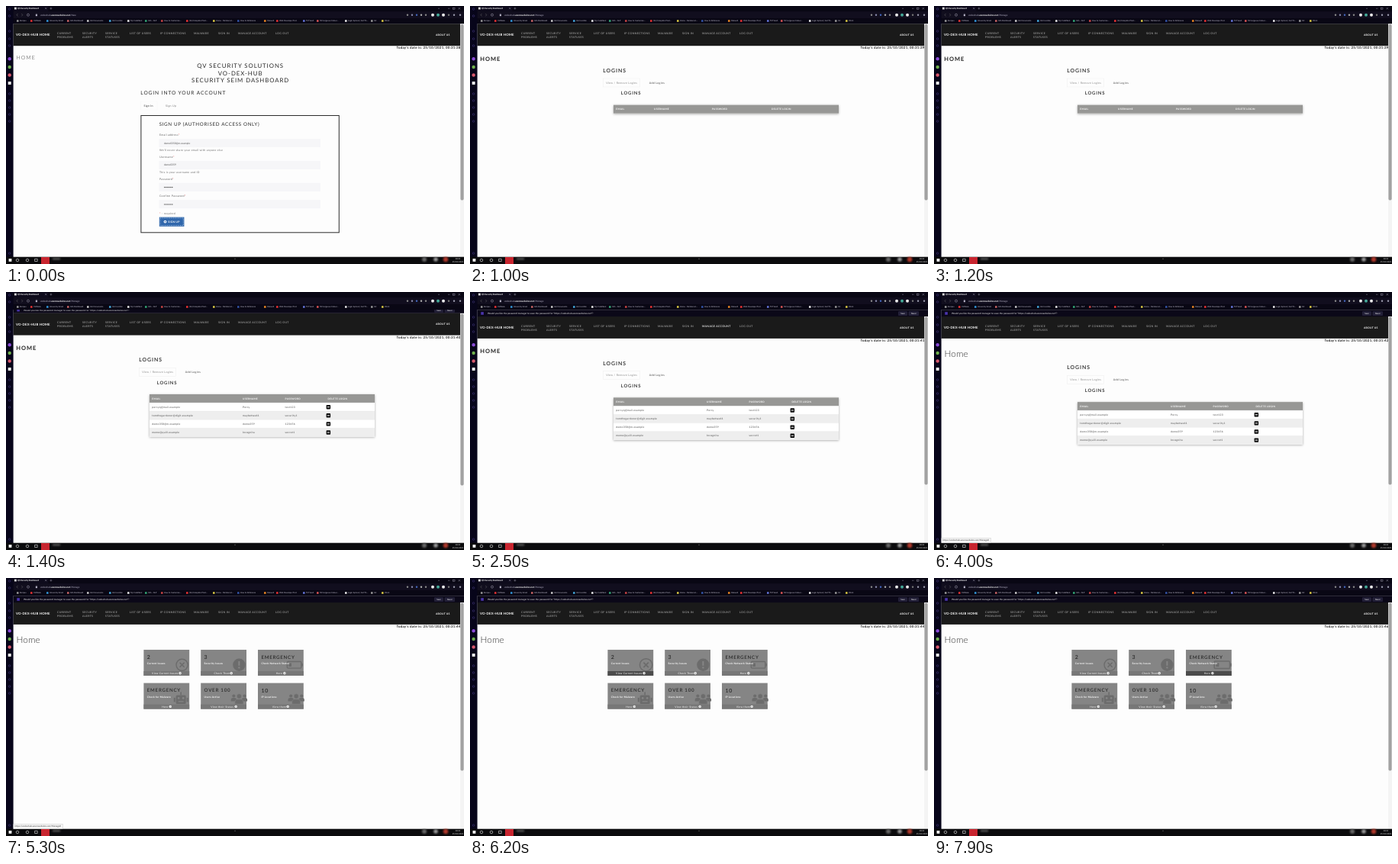
An HTML page that plays this animation: 600 by 338 pixels, repeating every 8000 ms.

```html
<!DOCTYPE html>
<html lang="en">
<head>
<meta charset="utf-8">
<title>Security Dashboard</title>
<style>
html, body { margin: 0; width: 100%; height: 100%; overflow: hidden; background: #000; }
svg { display: block; width: 100vw; height: 100vh; }
text { font-family: Lato, "Open Sans", sans-serif; white-space: pre; text-rendering: geometricPrecision; }
</style>
</head>
<body>
<svg id="stage" viewBox="0 0 600 338"></svg>
<script>
const LOOP = 8000;
const HOST = 'vodexhub.azurewebsites.net';

// y is the middle of the capitals
const T = (x, y, s, size, o = {}) =>
  `<text x="${x}" y="${y + size * 0.36}" font-size="${size}" font-weight="${o.w || 400}" ` +
  `letter-spacing="${o.ls ?? 0.3}" fill="${o.fill || '#555'}" text-anchor="${o.a || 'start'}"` +
  `${o.id ? ` id="${o.id}"` : ''}>${s}</text>`;
const R = (x, y, w, h, fill, extra = '') =>
  `<rect x="${x}" y="${y}" width="${w}" height="${h}" fill="${fill}" ${extra}/>`;
const C = (x, y, r, fill, extra = '') => `<circle cx="${x}" cy="${y}" r="${r}" fill="${fill}" ${extra}/>`;
const P = (d, stroke, w = 0.5) => `<path d="${d}" fill="none" stroke="${stroke}" stroke-width="${w}"/>`;
const G = (id, body, extra = '') => `<g id="${id}" ${extra}>${body}</g>`;

function nav() {
  const links = [[67, 'CURRENT', 'PROBLEMS'], [100, 'SECURITY', 'ALERTS'], [130, 'SERVICE', 'STATUSES'],
    [162, 'LIST OF USERS'], [202, 'IP CONNECTIONS'], [246, 'MALWARE'], [278, 'SIGN IN'],
    [304, 'MANAGE ACCOUNT'], [353, 'LOG OUT']];
  let s = R(9.5, 23.2, 585.5, 29, '#1a1a1a');
  s += T(13, 37.6, 'VO-DEX-HUB HOME', 4.3, { w: 700, ls: 0.2, fill: '#fff' });
  for (const [x, ...lines] of links) {
    lines.forEach((line, i) => {
      const id = line.startsWith('MANAGE') ? 'manage' : '';
      s += T(x, 35.6 + i * 5.2, line, 3.55, { w: 600, fill: '#a0a0a0', id });
    });
  }
  return s + T(563, 37.7, 'ABOUT US', 3.4, { w: 700, ls: 0.2, fill: '#fff' });
}

function signup() {
  const title = { a: 'middle', ls: 0.94, fill: '#2a2a2a' };
  const small = { fill: '#666' };
  const star = '<tspan fill="#e03030">*</tspan>';
  const field = (y, label, value, hint) =>
    T(201, y, label + star, 3.6, { ls: 0.25, fill: '#666' }) +
    R(200.5, y + 5, 211.5, 11, '#f6f6f8') +
    (value ? T(207, y + 10.5, value, 3.3, { ls: 0, fill: '#555' })
      : [0, 1, 2, 3, 4, 5].map(i => C(207.8 + i * 2, y + 10.7, 0.7, '#444')).join('')) +
    (hint ? T(201, y + 19.5, hint, 3.5, small) : '');
  return T(13.6, 67.6, 'HOME', 7, { w: 300, ls: 0.95, fill: '#333' }) +
    T(307.1, 78.5, 'QV SECURITY SOLUTIONS', 7.8, title) +
    T(307.1, 88, 'VO-DEX-HUB', 7.8, title) +
    T(307.1, 97.5, 'SECURITY SEIM DASHBOARD', 7.8, title) +
    T(176.3, 114, 'LOGIN INTO YOUR ACCOUNT', 6.65, { ls: 0.9, fill: '#2a2a2a' }) +
    R(176.5, 125, 21.5, 11, 'none', 'stroke="#f3f3f3" stroke-width=".4"') +
    T(180.5, 130.3, 'Sign In', 3.6, { ls: 0.25, fill: '#333' }) +
    T(209, 130.3, 'Sign Up', 3.6, { fill: '#777' }) +
    R(176.9, 143.5, 259.4, 153.3, '#fdfdfd', 'stroke="#2c2c2c" stroke-width="1"') +
    T(200.7, 155.2, 'SIGN UP (AUTHORISED ACCESS ONLY)', 6.3, { ls: 0.62, fill: '#2a2a2a' }) +
    field(169, 'Email address', 'demo0358@m.example', "We'll never share your email with anyone else") +
    field(197.8, 'Username', 'demo0359', 'This is your username and ID') +
    field(226.8, 'Password') + field(249.2, 'Confirm Password') +
    T(201, 271.5, star + ' - required', 3.5, small) +
    R(200.8, 276.6, 32.6, 12.2, '#2f66ab') +
    R(202, 277.8, 30.2, 9.8, 'none', 'id="focus" stroke="#cfe0f5" stroke-width=".8" stroke-dasharray="1 1.4"') +
    C(208.5, 282.6, 1.9, '#fff') + C(208.5, 282.6, 0.8, '#2f66ab') +
    T(212.3, 282.6, 'SIGN UP', 3.5, { w: 700, ls: 0.2, fill: '#fff' });
}

function table(cols, rows) {
  const x = 188, y = 129.6, w = 295, h = 11.1;
  const heads = ['EMAIL', 'USERNAME', 'PASSWORD', 'DELETE LOGIN'];
  let s = R(x, y, w, h * (rows.length + 1), '#fff', 'filter="url(#soft)"') + R(x, y, w, h, '#979795');
  heads.forEach((t, i) => s += T(cols[i], y + 5.6, t, 3.2, { w: 700, fill: '#fff' }));
  rows.forEach((row, i) => {
    const top = y + h * (i + 1), mid = top + 5.6;
    s += R(x, top, w, h, i % 2 ? '#eee' : '#fff') + P(`M${x} ${top}h${w}`, '#ddd', 0.3);
    row.forEach((t, k) => s += T(cols[k], mid, t, 3.3, { fill: '#444' }));
    s += R(419.6, mid - 2.7, 5.5, 5.4, '#0a0a0a', 'rx=".8"') + R(420.7, mid - 0.5, 3.3, 1, '#fff');
  });
  return s;
}

function logins() {
  const rows = [['percyq@mail.example', 'Percy', 'test123'],
    ['tomthegardener@digit.example', 'maybetwo61', 'security1'],
    ['demo358@m.example', 'demo359', '123456'],
    ['memo@quill.example', 'Incognita', 'secret1']];
  return T(174.3, 84.4, 'LOGINS', 6.9, { w: 600, ls: 0.94, fill: '#222' }) +
    R(174.3, 95, 48.2, 11, 'none', 'stroke="#eee" stroke-width=".5"') +
    T(178.2, 100.4, 'View / Remove Logins', 3.6, { fill: '#888' }) +
    T(234.7, 100.4, 'Add Logins', 3.6, { fill: '#444' }) +
    T(197.7, 114.3, 'LOGINS', 6, { w: 600, ls: 0.8, fill: '#222' }) +
    G('empty', table([191.3, 241, 317, 395], [])) +
    G('filled', table([191.3, 310, 365.6, 421.5], rows));
}

const CARD = '#858585', INK = '#6c6c6c';
const person = (x, y, k) => C(x, y - 3.6 * k, 2.6 * k, INK) +
  `<path d="M${x - 4.6 * k} ${y + 5 * k}v${-2 * k}q0 ${-3.4 * k} ${3.4 * k} ${-3.4 * k}h${2.4 * k}q${3.4 * k} 0 ${3.4 * k} ${3.4 * k}v${2 * k}z" fill="${INK}"/>`;
const people = person(-7, 0, 0.8) + person(7, 0, 0.8) +
  `<g stroke="${CARD}" stroke-width=".6">${person(0, 1.8, 1.2)}</g>`;
const robot = R(-6.5, -4, 13, 11.5, INK, 'rx="1.5"') + R(-0.8, -8, 1.6, 4, INK) + R(-9.4, -0.5, 2, 5.5, INK) +
  R(7.4, -0.5, 2, 5.5, INK) + C(-3, 0, 1.4, CARD) + C(3, 0, 1.4, CARD) + R(-3.5, 3.8, 7, 1.2, CARD);
const icons = [
  C(0, 0, 7.6, 'none', `stroke="${INK}" stroke-width="1.4"`) + P('M-3-3L3 3M3-3L-3 3', INK, 1.6),
  C(0, 0, 8.2, INK) + R(-1, -4.8, 2, 5.8, CARD) + C(0, 3.6, 1.2, CARD),
  R(-11.8, -4.3, 18.4, 8.6, 'none', `rx="1" stroke="${INK}" stroke-width="1.4"`) +
    R(7.2, -1.8, 1.5, 3.6, INK) + R(-9.8, -2.2, 3.6, 4.4, INK),
  `<g transform="translate(-1.4 0)">${robot}</g>`,
  people, people
];

function cards() {
  const data = [['2', 'Current Issues', 'View Current Issues'], ['3', 'Security Issues', 'Check Them'],
    ['EMERGENCY', 'Check Network Status', 'Here'], ['EMERGENCY', 'Check for Malware', 'Here'],
    ['OVER 100', 'Users Active', 'View their Status'], ['10', 'IP Locations', 'View them']];
  return data.map(([big, label, link], i) => {
    const x = 180.4 + (i % 3) * 74.8, y = i < 3 ? 94 : 137.6;
    const mid = x + 29.9, dot = mid + link.length * 0.85 + 1.6;
    return R(x, y, 59.8, 34, CARD) +
      G('icon' + i, icons[i], `data-x="${x + 50.2}" data-y="${y + 19.8}"`) +
      T(x + 4.4, y + 9.4, big, big.length < 3 ? 7 : 6.2, { w: 600, ls: 0.72, fill: '#2a2a2a' }) +
      T(x + 4.4, y + 18, label, 3.3, { w: 700, ls: 0.2, fill: '#fff' }) +
      R(x, y + 28, 59.8, 6, '#777', `id="foot${i}"`) +
      T(mid - 2, y + 30.8, link, 3.4, { ls: 0.25, fill: '#fff', a: 'middle' }) +
      C(dot, y + 30.8, 1.7, '#fff') +
      P(`M${dot - 1} ${y + 30.8}h1.8m-.8-.8l.8.8l-.8.8`, '#666', 0.4);
  }).join('');
}

function savebar() {
  const button = (x, w, s) => R(x, 25.2, w, 5.8, '#232038', 'rx=".8"') +
    T(x + w / 2, 28.1, s, 2.7, { fill: '#fff', ls: 0, a: 'middle' });
  return R(9.5, 23.2, 590.5, 8.9, '#0b0818') + R(14.3, 26.2, 3.6, 3.6, '#4a34ac') +
    T(23, 28, `Would you like the password manager to save the password for "https://${HOST}"?`, 3.05,
      { ls: 0.02, fill: '#eee' }) +
    button(561, 12, 'Save') + button(574.5, 13.5, 'Never');
}

function browser() {
  const marks = [[18, 'Recipes', '#999'], [36, 'VidNook', '#e33'], [57, 'University Email', '#39d'],
    [84, 'GIG Dashboard', '#c66'], [110, 'Uni Documents', '#ccc'], [139, 'Uni Invisible', '#4ad'],
    [163, 'My CodeNest', '#eee'], [186, 'GIG - GLP', '#3a7'], [207, 'How to Customise...', '#c44'],
    [240, '(26) Complete Prod...', '#e33'], [275, 'Home - Nimbora A...', '#dc4'], [307, 'How to Reference', '#35a'],
    [342, 'Oakwell', '#e82'], [358, 'Web Developer Test', '#e33'], [393, 'TM Vault', '#67d'],
    [411, '50 Gorgeous Colour...', '#d55'], [448, 'Login System | Get Th...', '#eee'],
    [482, 'Git', '#999'], [496, 'Work', '#dc4']];
  const dim = '#b8b5c8';
  let s = R(0, 0, 600, 23.2, '#090714') + R(0, 0, 9.6, 338, '#07051a') +
    R(9.6, 0, 46, 7.2, '#0e0b1c') + R(9.6, 7.2, 590.4, 8.8, '#110e1e') +
    R(11, 1.7, 2.8, 2.8, '#ddd') +
    T(15, 3.3, 'QV Security Dashboard', 2.9, { w: 700, ls: -0.1, fill: '#eee' }) +
    P('M51.2 2.2l2 2m0-2l-2 2M57.4 3.2h3m-1.5-1.5v3', dim, 0.4) +
    P('M15.5 10l-1.5 1.7l1.5 1.7M20.3 10l1.5 1.7l-1.5 1.7', '#777', 0.5) +
    C(29, 11.7, 1.5, 'none', `stroke="${dim}" stroke-width=".5"`) +
    R(38.8, 11.2, 2.2, 2, dim) + C(39.9, 11, 0.8, 'none', `stroke="${dim}" stroke-width=".4"`) +
    T(45, 11.7, '', 3.1, { ls: 0, fill: dim, id: 'url' });
  for (const [x, label, color] of marks) {
    s += R(x - 4, 18.2, 2.6, 2.6, color, 'rx=".6"') + T(x, 19.5, label, 2.6, { ls: -0.02, fill: '#c9c6d6' });
  }
  [[526, '#888'], [532, '#88a'], [538, '#46b'], [544, '#aaa'], [550, '#888'], [559, '#eee'], [566, '#4a9'],
    [573, '#eee'], [580, '#777'], [587, '#99a'], [595, '#99a']]
    .forEach(([x, c], i) => s += C(x, 11.7, i > 4 && i < 8 ? 2 : 1.2, c));
  s += P('M566 3.3h2M579 3.3h2.4M592.6 2.1l2.4 2.4m0-2.4l-2.4 2.4', dim, 0.4) +
    R(585.8, 2.2, 2.2, 2.2, 'none', `stroke="${dim}" stroke-width=".4"`);
  [[69.3, '#8a4ad8'], [80, '#6fb04c'], [90.5, '#d8586c']]
    .forEach(([y, c]) => s += C(4.7, y, 2.2, c));
  s += R(2.7, 99, 4, 4, '#eee', 'rx=".6"');
  [4, 13, 33, 43, 52, 115, 124, 133, 142, 151, 324]
    .forEach(y => s += C(4.6, y, 1.3, 'none', 'stroke="#3f3478" stroke-width=".6"'));
  return s;
}

function taskbar() {
  const line = 'fill="none" stroke="#ccc" stroke-width=".7"';
  return R(0, 328.7, 600, 9.3, '#0b0b0d') + R(3.6, 331, 3.8, 3.8, '#fff') +
    `<g ${line}><circle cx="15" cy="333" r="1.8"/><circle cx="28" cy="333" r="1.8"/><path d="M37.6 331.3h3.6v3.2h-3.6z"/></g>` +
    R(46, 329, 11, 9, '#c8252f') +
    `<g filter="url(#blur)">${R(61, 330, 10, 2.4, '#555') + C(548, 332, 3, '#666') + C(563, 332, 2.8, '#999') + C(576, 332, 3.2, '#b0382c')}</g>` +
    C(300, 331.2, 0.8, '#555') +
    T(592, 331.3, '00:31', 2.6, { ls: 0, fill: '#eee', a: 'middle' }) +
    T(592, 335.4, '25/10/2021', 2.6, { ls: 0, fill: '#eee', a: 'middle' });
}

document.getElementById('stage').innerHTML =
  `<defs><filter id="soft" x="-5%" y="-20%" width="110%" height="150%"><feDropShadow dx="0" dy=".8" stdDeviation="1.4" flood-opacity=".35"/></filter>
  <filter id="blur" x="-10%" y="-50%" width="120%" height="200%"><feGaussianBlur stdDeviation="1"/></filter></defs>` +
  R(0, 0, 600, 338, '#fdfdfd') +
  G('page', nav() + T(595.7, 54.8, '', 4.4, { w: 700, ls: 0.26, fill: '#222', a: 'end', id: 'date' }) +
    G('signup', signup()) +
    G('boldHome', T(13.2, 68.8, 'HOME', 7.5, { w: 700, ls: 1, fill: '#222' })) +
    G('lightHome', T(13.6, 72.4, 'Home', 11.8, { w: 300, ls: 0, fill: '#333' })) +
    G('logins', logins())) +
  G('cards', cards()) +
  R(595, 23.2, 5, 306, '#f4f4f4') + R(595.4, 24, 4.2, 230, '#a2a2a2', 'id="thumb" rx="2"') +
  G('savebar', savebar()) + browser() + taskbar() +
  G('status', R(9.8, 322.2, 64.4, 6.4, '#f7f7f7', 'stroke="#bbb" stroke-width=".4"') +
    T(11.6, 325.4, `https://${HOST}/Manage#`, 3, { ls: 0, fill: '#444' }));

const el = {};
document.querySelectorAll('[id]').forEach(n => el[n.id] = n);
const show = (id, on) => el[id].setAttribute('display', on ? 'inline' : 'none');
const clamp = v => Math.max(0, Math.min(1, v));
const ease = v => { v = clamp(v); return v * v * (3 - 2 * v); };
const hovers = [[6000, 7050], [7150, 7450], [7600, LOOP + 500]];

function draw(t) {
  const within = (a, b) => t >= a && t < b;
  const slide = ease((t - 1300) / 200), shift = 8.7 * slide;
  const sec = 38 + Math.floor((t + 700) / 1000);

  el.date.textContent = `Today's date is: 25/10/2021, 00:31:${sec}`;
  el.url.innerHTML = `vodexhub.<tspan fill="#fff" font-weight="700">azurewebsites.net</tspan>/${t < 1000 ? 'New' : 'Manage'}`;
  el.page.setAttribute('transform', `translate(0 ${shift})`);
  el.savebar.setAttribute('transform', `translate(0 ${shift - 8.7})`);
  el.thumb.setAttribute('y', 24 + shift);
  el.thumb.setAttribute('height', 230.6 - 1.25 * shift);

  show('signup', t < 1000);
  show('focus', t < 500);
  show('boldHome', within(1000, 3900));
  show('lightHome', t >= 3900);
  show('logins', within(1000, 4200));
  show('empty', t < 1300);
  show('filled', t >= 1300);
  show('savebar', t >= 1300);
  show('cards', t >= 4200);
  show('status', within(2700, 5800));
  el.logins.setAttribute('transform', `translate(0 ${t >= 3900 ? 5.8 : 0})`);
  el.manage.setAttribute('fill', within(2500, 2600) ? '#fff' : '#a0a0a0');

  for (let i = 0; i < 6; i++) {
    const [a, b] = hovers[i] || [Infinity, Infinity];
    const grow = ease((t - a) / 300) - ease((t - b) / 300);
    const icon = el['icon' + i];
    icon.setAttribute('transform', `translate(${icon.dataset.x} ${icon.dataset.y}) scale(${1 + 0.1 * grow})`);
    el['foot' + i].setAttribute('fill', within(a + 50, b) ? '#4c4c4c' : '#777');
  }
}

const start = performance.now();
function tick() {
  draw((performance.now() - start) % LOOP);
  requestAnimationFrame(tick);
}
tick();
</script>
</body>
</html>
```
